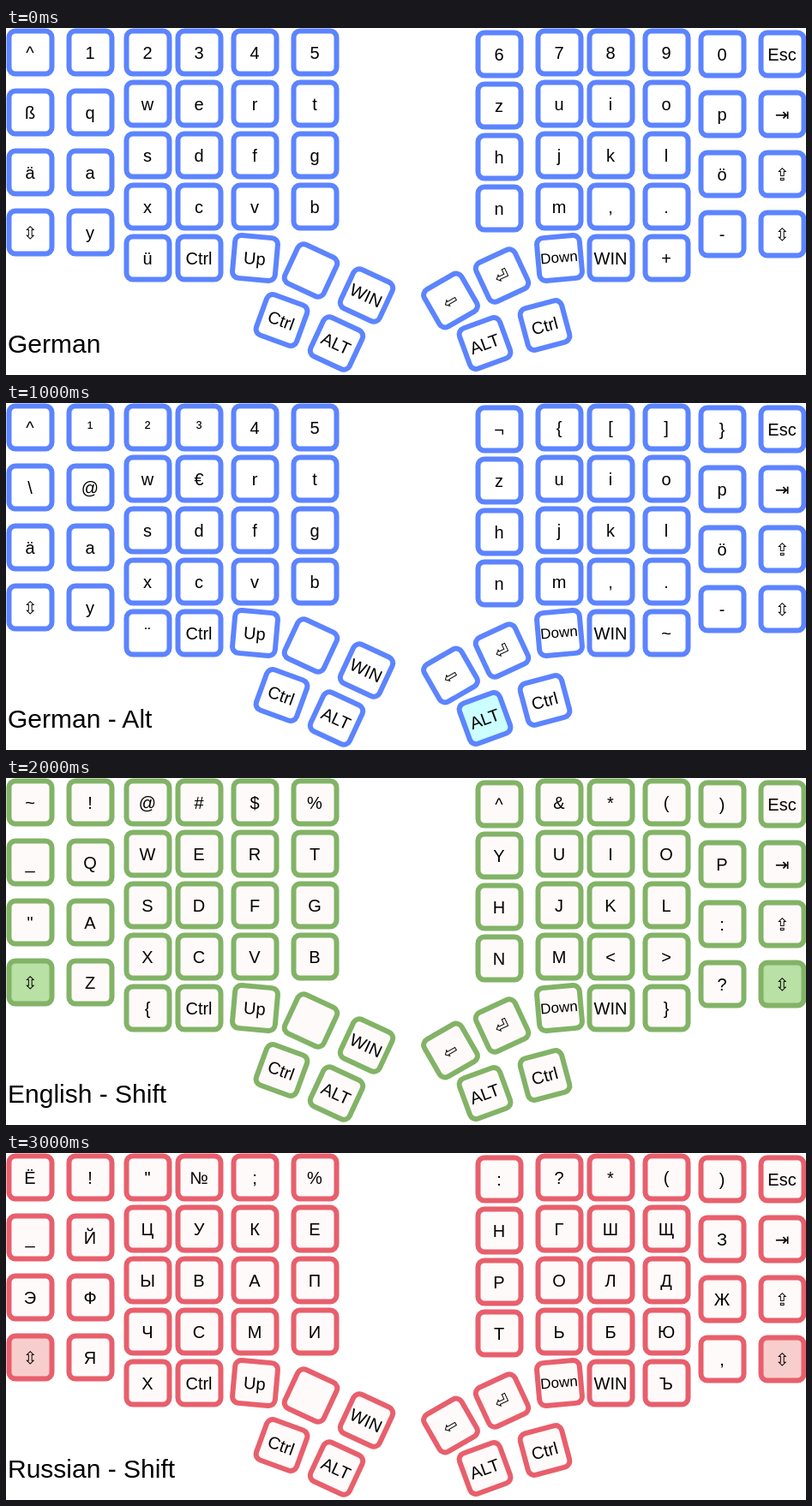
Write an HTML page that moves like this. It is 933 px wide and 405 px high and loops after 3500 ms.

```html
<!DOCTYPE html>
<html lang="en">
<head>
<meta charset="utf-8">
<title>Keyboard layouts</title>
<style>
  html, body { margin: 0; width: 100%; height: 100%; overflow: hidden; background: #fff; }
  svg { display: block; width: 100%; height: 100%; }
  text { font-family: "Liberation Sans", "DejaVu Sans", sans-serif; font-size: 20px; fill: #000; white-space: pre; }
  .key text { text-anchor: middle; }
  .key rect { stroke-width: 6; }
</style>
</head>
<body>
<svg id="board" viewBox="0 0 933 405" xmlns="http://www.w3.org/2000/svg"></svg>
<script>
const STEP = 500;
const board = document.getElementById("board");

const BLUE = { line: "#5c84ff", fill: "#ffffff", held: "#ccffff" };
const GREEN = { line: "#82b366", fill: "#fffafa", held: "#b9e0a5" };
const RED = { line: "#e85f6c", fill: "#fffafa", held: "#f8cecc" };

// Four typing rows, then the two keys of the bottom row.
const layouts = [
  { title: "German", theme: BLUE, held: "",
    rows: ["^1234567890", "ßqwertzuiop", "äasdfghjklö", "yxcvbnm,.-", "ü+"] },
  { title: "German - Shift", theme: BLUE, held: "shift",
    rows: ["°!\"§$%&/()=", "?QWERTZUIOP", "ÄASDFGHJKLÖ", "YXCVBNM;:_", "Ü*"] },
  { title: "German - Alt", theme: BLUE, held: "alt",
    rows: ["^¹²³45¬{[]}", "\\@w€rtzuiop", "äasdfghjklö", "yxcvbnm,.-", "¨~"] },
  { title: "English", theme: GREEN, held: "",
    rows: ["`1234567890", "-qwertyuiop", "'asdfghjkl;", "zxcvbnm,./", "[]"] },
  { title: "English - Shift", theme: GREEN, held: "shift",
    rows: ["~!@#$%^&*()", "_QWERTYUIOP", "\"ASDFGHJKL:", "ZXCVBNM<>?", "{}"] },
  { title: "Russian", theme: RED, held: "",
    rows: ["Ё1234567890", "-йцукенгшщз", "эфывапролдж", "ячсмитьбю.", "хъ"] },
  { title: "Russian - Shift", theme: RED, held: "shift",
    rows: ["Ё!\"№;%:?*()", "_ЙЦУКЕНГШЩЗ", "ЭФЫВАПРОЛДЖ", "ЯЧСМИТЬБЮ,", "ХЪ"] }
];

function add(parent, tag, attrs) {
  const el = document.createElementNS("http://www.w3.org/2000/svg", tag);
  for (const name in attrs) el.setAttribute(name, attrs[name]);
  parent.appendChild(el);
  return el;
}

const keys = [];
function addKey(x, y, label = "", angle = 0, role = "") {
  const g = add(board, "g", { class: "key", transform: `translate(${x} ${y}) rotate(${angle})` });
  const rect = add(g, "rect", { x: -25, y: -25, width: 50, height: 50, rx: 7.5 });
  const text = add(g, "text", { x: -0.5, y: 7.5 });
  text.textContent = label;
  const key = { rect, text, role };
  keys.push(key);
  return key;
}

// Typing keys: outer columns are spaced wider than inner ones.
const columns = [28.5, 98.5, 165.5, 225.5, 290.5, 360.5, 575.5, 645.5, 705.5, 770.5, 835.5];
const typing = [];
for (let row = 0; row < 4; row++) {
  for (let col = row < 3 ? 0 : 1; col < 11; col++) {
    const pitch = col < 2 || col === 10 ? 70 : 60;
    const top = col === 6 || col === 10 ? 30.5 : 28.5;
    typing.push(addKey(columns[col], top + row * pitch));
  }
}
typing.push(addKey(165.5, 268.5), addKey(770.5, 268.5));

// Modifiers and right edge.
addKey(28.5, 238.5, "⇳", 0, "shift");
addKey(905.5, 30.5, "Esc");
addKey(905.5, 100.5, "⇥");
addKey(905.5, 170.5, "⇪");
addKey(905.5, 240.5, "⇳", 0, "shift");
addKey(225.5, 268.5, "Ctrl");
addKey(705.5, 268.5, "WIN");

// Thumb clusters.
addKey(290.5, 268.5, "Up", 5);
addKey(355.5, 283, "", 25);
addKey(420.5, 312, "WIN", 25);
addKey(321.5, 341, "Ctrl", 20);
addKey(385.5, 368, "ALT", 25);
const down = addKey(645.5, 268.5, "Down", -5);
down.text.style.fontSize = "17px";
down.text.setAttribute("y", 5);
addKey(578.5, 289, "⏎", -25);
addKey(518.5, 318, "⇦", -30);
addKey(558.5, 368, "ALT", -20, "alt");
addKey(628.5, 347, "Ctrl", -15);

const title = add(board, "text", { x: 2, y: 379, style: "font-size:30px" });

let shown = -1;
function show(index) {
  if (index === shown) return;
  shown = index;
  const { title: name, theme, held, rows } = layouts[index];
  title.textContent = name;
  [...rows.join("")].forEach((char, i) => { typing[i].text.textContent = char; });
  for (const { rect, role } of keys) {
    rect.setAttribute("stroke", theme.line);
    rect.setAttribute("fill", role && role === held ? theme.held : theme.fill);
  }
}

const start = performance.now();
function tick() {
  const time = Math.max(0, performance.now() - start);
  show(Math.floor(time / STEP) % layouts.length);
  requestAnimationFrame(tick);
}
show(0);
requestAnimationFrame(tick);
</script>
</body>
</html>
```
